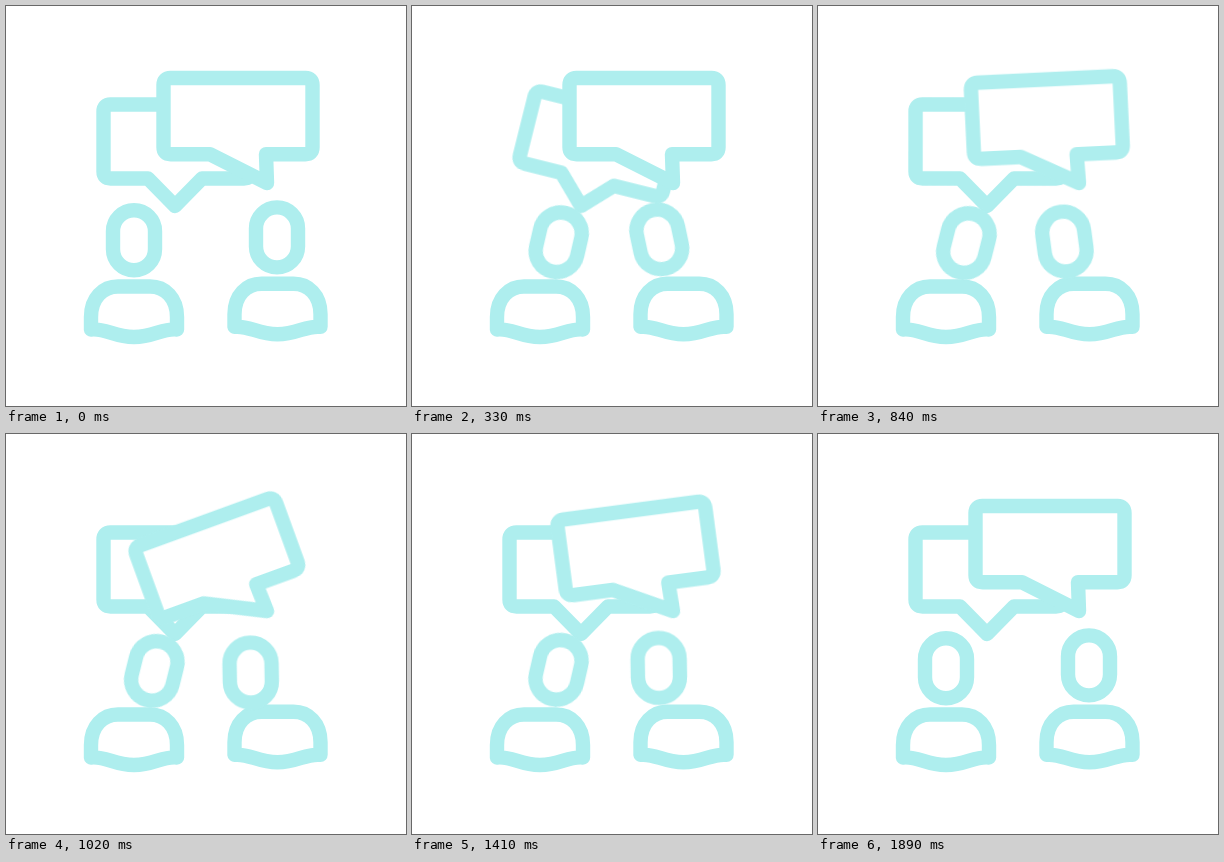
Write an HTML page without scripts that moves like this. It is 400 px wide and 400 px high and loops after 1.92 s.

```html
<!DOCTYPE html>
<html lang="en">
<head>
<meta charset="utf-8">
<title>Two people talking</title>
<style>
  html, body { margin: 0; width: 100%; height: 100%; overflow: hidden; background: #fff; }
  svg { display: block; width: 100%; height: 100%; }
  .art { fill: #fff; stroke: #aeeeee; stroke-width: 14.4; stroke-linejoin: round; stroke-linecap: round; }
  .head { fill: none; }
  .move { animation: 1920ms ease-in-out infinite; }
  .bubble-l { transform-origin: 169px 200px; animation-name: swing-l; }
  .bubble-r { transform-origin: 261px 177px; animation-name: swing-r; }
  .head-l { transform-origin: 128px 234.3px; animation-name: lean-l; }
  .head-r { transform-origin: 271px 231.4px; animation-name: lean-r; }
  .body-l { transform-origin: 128px 331px; animation-name: squash; }

  @keyframes swing-l {
    0%, 4.7% { transform: rotate(0); }
    17.2% { transform: rotate(14deg); }
    27.6% { transform: rotate(-16deg); }
    37% { transform: rotate(8deg); }
    46.9% { transform: rotate(-2deg); }
    52.6%, 100% { transform: rotate(0); }
  }
  @keyframes swing-r {
    0%, 40.6% { transform: rotate(0); }
    53.1% { transform: rotate(-20deg); }
    63.3% { transform: rotate(14.5deg); }
    73.4% { transform: rotate(-7.5deg); }
    83.3% { transform: rotate(2deg); }
    93.7%, 100% { transform: rotate(0); }
  }
  @keyframes lean-l {
    0%, 1.6% { transform: translate(0, 0) rotate(0); }
    17.2% { transform: translate(18.7px, 2px) rotate(13deg); }
    32.8% { transform: translate(20.5px, 3px) rotate(14.5deg); }
    53.1% { transform: translate(20.3px, 2.7px) rotate(14deg); }
    73.4%, 78% { transform: translate(18.5px, 1.6px) rotate(13deg); }
    87.5% { transform: translate(6.5px, 3.2px) rotate(3deg); }
    95%, 100% { transform: translate(0, 0) rotate(0); }
  }
  @keyframes lean-r {
    0%, 1.6% { transform: translate(0, 0) rotate(0); }
    17.2% { transform: translate(-23.7px, 2px) rotate(-12deg); }
    32.8%, 37.5% { transform: translate(-23.7px, 2.6px) rotate(-11deg); }
    53.1% { transform: translate(-26.3px, 7.2px) rotate(-1deg); }
    73.4% { transform: translate(-24.2px, 2.6px) rotate(-1deg); }
    86%, 100% { transform: translate(0, 0) rotate(0); }
  }
  @keyframes squash {
    0%, 78% { transform: scale(1); }
    87.5% { transform: scale(1.025, .975); }
    95%, 100% { transform: scale(1); }
  }
</style>
</head>
<body>
<svg viewBox="0 0 400 400">
  <defs>
    <path id="body" d="M85 323.5 V311 C85 292 97 280.5 112 280.5 H144 C159 280.5 171 292 171 311 V323.5 C156 322 148 331 128 331 C108 331 100 322 85 323.5 Z"/>
    <rect id="head" x="107" y="204.3" width="42" height="60" rx="21"/>
  </defs>
  <g class="art">
    <path class="move bubble-l" d="M104.500 98.500 H238 q7 0 7 7 V165.500 q0 7 -7 7 H196 L169 200 L142 172.500 H104.500 q-7 0 -7 -7 V105.500 q0 -7 7 -7 Z"/>
    <path class="move bubble-r" d="M164.500 72 H299.500 q7 0 7 7 V141.200 q0 7 -7 7 H260 L261 177 L204 148.200 H164.500 q-7 0 -7 -7 V79 q0 -7 7 -7 Z"/>
    <use class="move body-l" href="#body"/>
    <use href="#body" x="143.500" y="-2.700"/>
    <g class="head">
      <g class="move head-l"><use href="#head"/></g>
      <g class="move head-r"><use href="#head" x="143" y="-2.900"/></g>
    </g>
  </g>
</svg>
</body>
</html>
```
